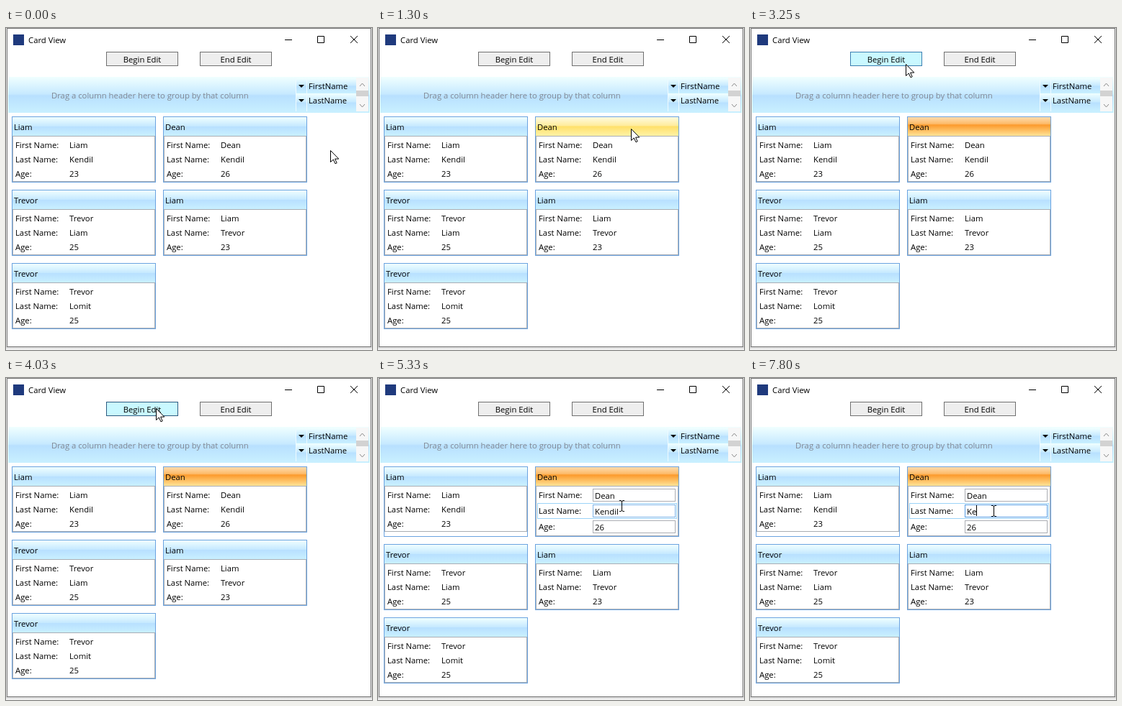
These frames come from a looping animation (508 by 448 pixels, 8000 ms). An HTML page:

```html
<!DOCTYPE html>
<html lang="en">
<head>
<meta charset="utf-8">
<title>Card View</title>
<style>
  html, body { margin: 0; width: 100%; height: 100%; overflow: hidden; background: #fff; }
  svg { display: block; width: 508px; height: 448px; }
  text { font: 11.3px "Open Sans", "Noto Sans", sans-serif; fill: #000; white-space: pre; }
  .mid { text-anchor: middle; }
  .line { fill: none; stroke: #000; }
  .button { fill: #eee; stroke: #707070; }
  .button.hover { fill: #c9f8ff; stroke: #3c7fb1; }
  .button.down { fill: #c9f8ff; stroke: #2c5a80; }
  .card { fill: #fff; stroke: #6ba3e0; }
  .inner { fill: none; stroke: #a9adb3; }
  .field { fill: #fff; stroke: #abadb3; }
  .field.hover { stroke: #7eb4ea; }
  .field.focus { stroke: #569de5; }
</style>
</head>
<body>
<svg viewBox="0 0 508 448">
  <defs>
    <linearGradient id="blue" x2="0" y2="1">
      <stop stop-color="#f0ffff"/><stop offset=".48" stop-color="#c6e9ff"/>
      <stop offset=".52" stop-color="#b8e0ff"/><stop offset="1" stop-color="#c9f0ff"/>
    </linearGradient>
    <linearGradient id="yellow" x2="0" y2="1">
      <stop stop-color="#fffbe0"/><stop offset=".46" stop-color="#ffec9c"/>
      <stop offset=".5" stop-color="#ffe06a"/><stop offset="1" stop-color="#fff2a6"/>
    </linearGradient>
    <linearGradient id="orange" x2="0" y2="1">
      <stop stop-color="#fedcae"/><stop offset=".36" stop-color="#fdba68"/>
      <stop offset=".42" stop-color="#fc9a2c"/><stop offset="1" stop-color="#ffe397"/>
    </linearGradient>
    <linearGradient id="shade" x2="0" y2="1">
      <stop stop-color="#cfcfcf"/><stop offset="1" stop-color="#f8f8f8"/>
    </linearGradient>
  </defs>

  <rect width="508" height="448" fill="#eee"/>
  <rect y="443" width="508" height="5" fill="url(#shade)"/>
  <rect x="1.5" y=".5" width="505" height="443" fill="#fff" stroke="#707070"/>
  <rect x="10" y="9" width="15" height="15" fill="#1f3a7d"/>
  <text x="31" y="21">Card View</text>
  <path class="line" d="M387 16.5h10M432.5 11.5h9v9h-9zM478 11l10 10M488 11l-10 10"/>

  <rect id="begin" class="button" x="139.5" y="33.5" width="99" height="19"/>
  <text class="mid" x="189" y="48">Begin Edit</text>
  <rect class="button" x="269.5" y="33.5" width="99" height="19"/>
  <text class="mid" x="319" y="48">End Edit</text>

  <rect x="3" y="68" width="502" height="50" fill="url(#blue)"/>
  <text x="63" y="98" style="fill:#808791">Drag a column header here to group by that column</text>
  <rect x="402" y="70" width="84" height="21" fill="url(#blue)"/>
  <rect x="402" y="91" width="84" height="25" fill="url(#blue)"/>
  <path d="M402.5 69v47M417.5 69v47" stroke="#eefaff"/>
  <path d="M406 79h8l-4 4zM406 99h8l-4 4z"/>
  <text x="420" y="85">FirstName</text>
  <text x="420" y="105">LastName</text>
  <rect x="486" y="69" width="17" height="47" fill="#f7f7f7"/>
  <rect x="486" y="87" width="17" height="8" fill="#d2d2d2"/>
  <path d="M491 81l3.5-4 3.5 4M491 106l3.5 4 3.5-4" fill="none" stroke="#8a8a8a"/>

  <g id="view"></g>
  <g id="edit"></g>
  <path id="arrow" d="M.5 .5V16.5L4.3 13 7 18.8 9.2 17.8 6.6 12.1H11.8Z" fill="#fff" stroke="#000"/>
  <path id="beam" class="line" d="M-3 -7.5h2l1.5 1 1.5-1h2M.5-7V7M-3 7.5h2l1.5-1 1.5 1h2"/>
</svg>
<script>
const LOOP = 8000;
const $ = id => document.getElementById(id);
const NAME = 'Kendil';
const people = [
  ['Liam', NAME, 23], ['Dean', NAME, 26],
  ['Trevor', 'Liam', 25], ['Liam', 'Trevor', 23],
  ['Trevor', 'Lomit', 25]
];
const labels = ['First Name:', 'Last Name:', 'Age:'];
const ACTIVE = 1;

const text = (x, y, s, attrs = '') => `<text x="${x}" y="${y}" ${attrs}>${s}</text>`;
const box = (x, y, w, h, attrs) =>
  `<rect x="${x + .5}" y="${y + .5}" width="${w - 1}" height="${h - 1}" ${attrs}/>`;

function field(x, y, value, row) {
  const live = row === 1;
  return (live ? box(x + 3, y - 2, 194, 22, 'id="row" fill="none" stroke="#9bd3f8"') : '') +
    box(x + 80, y, 115, 18, `class="field" ${live ? 'id="field"' : ''}`) +
    text(x + 83, y + 14, value, live ? 'id="value"' : '');
}

function card(person, i, editing) {
  const x = 8 + i % 2 * 210, line = i >> 1;
  const y = 123 + line * 102 + (editing && line ? 6 : 0);
  const active = i === ACTIVE, open = editing && active;
  const tall = editing && !line ? 98 : 92;
  const headId = active && !editing ? 'id="head"' : '';
  let out = box(x, y, 200, tall, 'class="card"') +
    `<rect ${headId} x="${x + 1}" y="${y + 1}" width="198" height="26" fill="url(#${open ? 'orange' : 'blue'})"/>` +
    box(x + 1, y + 27, 198, open ? 70 : 64, 'class="inner"') +
    text(x + 3, y + 19, person[0]);
  labels.forEach((label, r) => {
    const base = y + 44 + r * (open ? 22 : 20);
    const value = open ? field(x, base - 13, person[r], r) : text(x + 80, base, person[r]);
    out += value + text(x + 5, base, label);
  });
  return out;
}

$('view').innerHTML = people.map((p, i) => card(p, i, false)).join('');
$('edit').innerHTML = people.map((p, i) => card(p, i, true)).join('') +
  '<path id="caret" class="line" d="M.5 177v15"/>';

// [time, x, y] of the pointer
const pointer = [
  [0, 450, 170], [390, 437, 166], [650, 428, 162], [780, 413, 156], [910, 396, 150],
  [1040, 378, 145], [1170, 362, 142], [1300, 351, 140], [2340, 355, 137], [2470, 336, 120],
  [2600, 308, 102], [2730, 282, 87], [2860, 258, 74], [2990, 238, 63], [3120, 224, 56],
  [3250, 216, 50], [3380, 211, 45], [3510, 208, 42], [4680, 268, 76], [4810, 352, 136],
  [4940, 409, 186], [5330, 338, 178], [5460, 338, 182], [5590, 338, 185]
];
const header = [[0, 'blue'], [1040, 'yellow'], [1560, 'orange']];
const button = [[0, ''], [3250, 'hover'], [4030, 'down'], [4290, 'hover'], [4680, '']];
const border = [[0, ''], [4940, 'hover'], [5850, 'focus']];
// [time, letters left, caret shown]
const typing = [[0, 6, 0], [5850, 6, 1], [6500, 5, 1], [6890, 4, 1], [7150, 4, 0], [7410, 3, 1], [7800, 2, 1]];

const at = (steps, t) => steps.reduce((last, s) => s[0] <= t ? s : last);
const show = (id, on) => { $(id).style.display = on ? '' : 'none'; };

function draw(t) {
  const [, x, y] = at(pointer, t);
  const editing = t >= 4290, inField = t >= 4940;
  show('view', !editing);
  show('edit', editing);
  show('row', inField);
  show('arrow', !inField);
  show('beam', inField);
  $(inField ? 'beam' : 'arrow').setAttribute('transform', `translate(${x} ${y})`);
  $('head').setAttribute('fill', `url(#${at(header, t)[1]})`);
  $('begin').setAttribute('class', 'button ' + at(button, t)[1]);
  $('field').setAttribute('class', 'field ' + at(border, t)[1]);

  const [, count, caret] = at(typing, t);
  $('value').textContent = NAME.slice(0, count);
  show('caret', caret);
  if (caret) {
    const end = 301 + Math.round($('value').getComputedTextLength());
    $('caret').setAttribute('transform', `translate(${end} 0)`);
  }
}

function tick() {
  draw(performance.now() % LOOP);
  requestAnimationFrame(tick);
}
tick();
</script>
</body>
</html>
```
